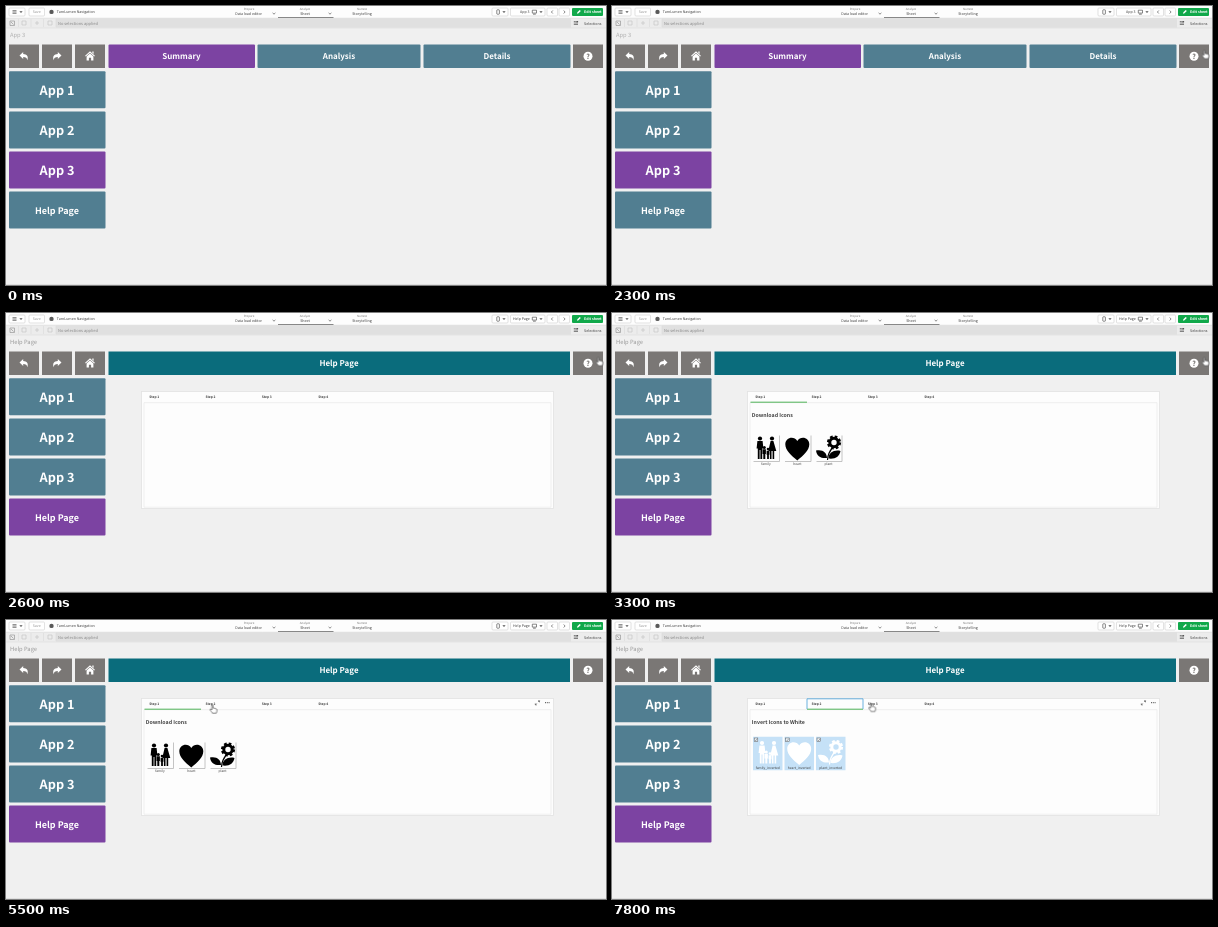
An HTML page that plays this animation: 600x279 px, repeating every 8000 ms.

```html
<!DOCTYPE html>
<html lang="en">
<head>
<meta charset="utf-8">
<title>Help page navigation</title>
<style>
html, body { margin: 0; width: 100%; height: 100%; overflow: hidden; background: #f0f0f0; }
svg { display: block; width: 100vw; height: 100vh; }
text {
  font-family: "Noto Sans CJK JP", "Noto Sans CJK SC", "Noto Sans", sans-serif;
  font-size: 3.6px; fill: #404040; text-rendering: geometricPrecision;
}
.mid text, text.mid { text-anchor: middle; }
.sub { font-size: 2.9px; fill: #777; }
.title { font-size: 5.8px; }
.tile { fill: #517e91; }
.on { fill: #7c43a2; }
.gray { fill: #7a7775; }
.big text, .tabs text { fill: #fff; font-weight: 600; }
.big text { font-size: 12.7px; }
.big .long { font-size: 9px; }
.tabs text { font-size: 8px; }
.box { fill: #fff; stroke: #cfcfcf; stroke-width: .6; }
.panel { fill: #fdfdfd; stroke: #e2e2e2; stroke-width: .8; }
.line { fill: none; stroke: #555; stroke-width: .7; }
.faint { fill: none; stroke: #c6c6c6; stroke-width: .7; }
.steps text, .names text { font-size: 3.3px; }
.steps text { font-weight: 600; }
.head { font-size: 5.25px; font-weight: 600; }

/* Scene switches */
.app, .blank, .help, .late, .one, .two, .head2, .files, .tools, .cursor, .arrow, .hand {
  animation: 8s step-end infinite;
}
.app { animation-name: app; }
.blank { animation-name: blank; }
.help { animation-name: help; }
.late { animation-name: late; }
.one { animation-name: one; }
.two { animation-name: two; }
.head2 { animation-name: head2; }
.files { animation-name: files; }
.tools { animation-name: tools; }
.arrow { animation-name: arrow; }
.hand { animation-name: hand; }
.cursor { animation: move 8s ease-in-out infinite; }
@keyframes app { 0% { opacity: 1 } 30%, 100% { opacity: 0 } }
@keyframes blank { 0% { opacity: 0 } 30% { opacity: 1 } 32.5%, 100% { opacity: 0 } }
@keyframes help { 0% { opacity: 0 } 32.5%, 100% { opacity: 1 } }
@keyframes late { 0% { opacity: 0 } 30%, 100% { opacity: 1 } }
@keyframes one { 0% { opacity: 0 } 33.75% { opacity: 1 } 78.75%, 100% { opacity: 0 } }
@keyframes two { 0% { opacity: 0 } 78.75%, 100% { opacity: 1 } }
@keyframes head2 { 0% { opacity: 0 } 80%, 100% { opacity: 1 } }
@keyframes files { 0% { opacity: 0 } 85%, 100% { opacity: 1 } }
@keyframes tools { 0% { opacity: 0 } 56.25%, 100% { opacity: 1 } }
@keyframes arrow { 0% { opacity: 0 } 11.25% { opacity: 1 } 20% { opacity: 0 } 48.75% { opacity: 1 } 56.25%, 100% { opacity: 0 } }
@keyframes hand { 0% { opacity: 0 } 20% { opacity: 1 } 48.75% { opacity: 0 } 56.25%, 100% { opacity: 1 } }
@keyframes move {
  0%, 10% { transform: translate(66px, 166px) }
  21.25% { transform: translate(591px, 47px) }
  23.75%, 46.25% { transform: translate(592.6px, 44.5px) }
  57.5%, 61.25% { transform: translate(164.3px, 81px) }
  68.75%, 90% { transform: translate(206.6px, 85px) }
  97.5%, 100% { transform: translate(259.3px, 83.3px) }
}
</style>
</head>
<body>
<svg viewBox="0 0 600 279">
  <defs>
    <path id="caret" d="M-1.6-.7h3.2L0 1.1z" fill="#555"/>
    <path id="chevron" class="line" d="M-1.4-.6L0 .7 1.4-.6"/>
    <path id="back" d="M-4.5-.6L-.8-4v2.1C3-1.8 4.6.6 3.4 4.2 3 2 1.8 1-.8 1v2z"/>
    <g id="family">
      <circle cx="-6" cy="-9.5" r="2.1"/><circle cx="6" cy="-9.5" r="2.1"/>
      <circle cx="-1.7" cy="-.6" r="1.5"/><circle cx="2" cy="1" r="1.3"/>
      <path d="M-8.6-7h5.2l.8 7.4h-1.2V11h-1.8V2h-.8v9h-1.8V.4h-1.2zM4.6-7h2.8l2.9 10H8.2v8H6.6V3H5.5v8H3.9V3H2.3zM-3.4 1.3h3.3v4.6h-.6V11h-2V5.9h-.7zM.6 2.7h2.8v4h-.5V11H1.1V6.7H.6z"/>
    </g>
    <path id="heart" d="M0 12C-6 7-12 2-12-4.2-12-11-3.4-13.2 0-7.4 3.4-13.2 12-11 12-4.2 12 2 6 7 0 12z"/>
    <g id="plant">
      <path d="M-12.5 2C-6 .5-1.500 4-1.500 9.500-8 10-11.500 8-12.500 2zM12 2.500C6 1 0 4 0 10c7 .8 11-2 12-7.500z"/>
      <path d="M-1 11.500C-1 6 1.500 2 5-2" fill="none" stroke="currentColor" stroke-width="1.2"/>
      <circle cx="5.500" cy="-6" r="4.200" fill="none" stroke="currentColor" stroke-width="3"/>
      <circle cx="5.500" cy="-6" r="5.800" fill="none" stroke="currentColor" stroke-width="2.600" stroke-dasharray="2.600 1.955"/>
    </g>
    <g id="nav">
      <path class="gray" d="M3 38.500h30v23.500H3zM36 38.500h30v23.500H36zM69 38.500h30v23.500H69zM567 38.500h30v23.500H567z"/>
      <g fill="#fff">
        <use href="#back" x="18" y="50"/>
        <use href="#back" transform="translate(51 50) scale(-1 1)"/>
        <path d="M84 45.300l4.900 4.500-.7.800L84 46.700l-4.200 3.900-.7-.8zM86.300 45.500h1.300v2.500l-1.300-1.200zM84 47.500l3.400 3.100v3.900h-2.300v-2.700h-2.200v2.700h-2.300v-3.900z"/>
        <circle cx="582" cy="50.300" r="4.500"/>
      </g>
      <text x="582" y="52.900" class="mid" style="font-size:7px;font-weight:700;fill:#6d6a68">?</text>
    </g>
    <g id="apps" class="big mid">
      <text x="51" y="88.700">App 1</text>
      <text x="51" y="128.700">App 2</text>
      <text x="51" y="168.900">App 3</text>
      <text x="51" y="207.500" class="long">Help Page</text>
    </g>
    <g id="check">
      <rect width="3.600" height="3.600" fill="#eef6fc" stroke="#555" stroke-width=".5"/>
      <path d="M.8 1.900l.8.8 1.400-1.900" class="line" style="stroke-width:.5"/>
    </g>
  </defs>

  <rect width="600" height="279" fill="#f0f0f0"/>
  <path d="M0 278.500h600" stroke="#dedede"/>

  <!-- Top bar -->
  <rect width="600" height="12" fill="#fdfdfd"/>
  <g class="box">
    <rect x="3" y="2" width="16" height="8" rx="1"/>
    <rect x="23" y="2" width="15.500" height="8" rx="1"/>
    <rect x="486" y="2" width="16" height="8" rx="1"/>
    <rect x="504.500" y="2" width="34.500" height="8" rx="1"/>
    <rect x="541" y="2" width="10.500" height="8" rx="1"/>
    <rect x="553" y="2" width="10.500" height="8" rx="1"/>
  </g>
  <path class="line" d="M6.500 4.600h4M6.500 6h4M6.500 7.400h4"/>
  <use href="#caret" x="15" y="6"/>
  <text x="30.700" y="7.300" class="mid" style="fill:#999">Save</text>
  <circle cx="45.500" cy="5.900" r="2.200" fill="#595959"/>
  <text x="50.800" y="7.300">TarnLumen Navigation</text>
  <g class="mid">
    <text x="243" y="4.200" class="sub">Prepare</text>
    <text x="299" y="4.200" class="sub">Analyze</text>
    <text x="356" y="4.200" class="sub">Narrate</text>
    <text x="242.600" y="8.900" font-weight="500">Data load editor</text>
    <text x="299" y="8.900" font-weight="500">Sheet</text>
    <text x="356" y="8.900" font-weight="500">Storytelling</text>
  </g>
  <use href="#chevron" x="268" y="7.500"/>
  <use href="#chevron" x="324" y="7.500"/>
  <path d="M272 11.500h55.500" stroke="#666" stroke-width=".9"/>
  <rect x="490.800" y="3.800" width="2.600" height="4.400" rx=".5" class="line"/>
  <use href="#caret" x="498" y="6"/>
  <text x="514" y="7.300" class="app">App 3</text>
  <text x="507" y="7.300" class="late">Help Page</text>
  <path class="line" d="M526.300 4.200h4.200v2.900h-4.200zM527 8.200h2.800"/>
  <use href="#caret" x="535" y="6"/>
  <path class="line" d="M546.800 4.500L545.400 6l1.400 1.500M557.700 4.500L559.100 6l-1.400 1.500"/>
  <rect x="566" y="2" width="31" height="8" rx="1" fill="#10a84a"/>
  <path d="M571 7.700l.4-1.500 2.300-2.300 1.100 1.100-2.300 2.300z" fill="#fff"/>
  <text x="578" y="7.300" font-weight="600" style="fill:#fff">Edit sheet</text>

  <!-- Selections bar -->
  <rect y="12" width="600" height="10" fill="#ececec"/>
  <rect x="50" y="12.500" width="515" height="9" fill="#e0e0e0"/>
  <path d="M0 12.200h600M0 22h600" stroke="#dcdcdc" stroke-width=".6"/>
  <path class="line" style="stroke:#999" d="M4 15h4.500v4.500H4zM5 16l2.500 2.500"/>
  <path class="faint" d="M16 15h4v4h-4zM29 17h4M31 15v4M42 15h4v4h-4z"/>
  <path d="M12.500 13v8M25 13v8M37.500 13v8M50 13v8" stroke="#dadada" stroke-width=".6"/>
  <text x="52" y="18.500" style="font-size:4px;fill:#888">No selections applied</text>
  <path class="line" d="M567.800 15.500h2M567.800 17h4.200M567.800 18.500h4.200"/>
  <rect x="570.300" y="15" width="1.800" height="1.300" fill="#555"/>
  <text x="578" y="18.500" font-weight="500">Selections</text>

  <text x="4" y="31.300" class="title app" style="fill:#b0b0b0">App 3</text>
  <text x="4" y="31.300" class="title late" style="fill:#999">Help Page</text>

  <!-- First sheet -->
  <g class="app">
    <use href="#nav"/>
    <g class="tile">
      <rect x="102.500" y="38.500" width="146.500" height="23.500" rx="1" class="on"/>
      <rect x="251.500" y="38.500" width="163" height="23.500" rx="1"/>
      <rect x="417.500" y="38.500" width="147" height="23.500" rx="1"/>
      <rect x="3" y="65.300" width="96.500" height="37" rx="1"/>
      <rect x="3" y="105.400" width="96.500" height="37" rx="1"/>
      <rect x="3" y="145.600" width="96.500" height="37" rx="1" class="on"/>
      <rect x="3" y="185.600" width="96.500" height="37" rx="1"/>
    </g>
    <g class="tabs mid">
      <text x="175.500" y="53.300">Summary</text>
      <text x="333" y="53.300">Analysis</text>
      <text x="491" y="53.300">Details</text>
    </g>
    <use href="#apps"/>
  </g>

  <!-- Loading placeholders -->
  <g class="blank">
    <path class="panel" d="M2.500 38.500h31v23.500h-31zM35.500 38.500h31v23.500h-31zM68.500 38.500h31v23.500h-31zM102.500 38.500h462v23.500h-462zM566.500 38.500h31v23.500h-31zM2.500 65.500h97v37h-97zM2.500 105.500h97v37h-97zM2.500 145.500h97v37h-97zM2.500 185.500h97v37h-97zM135.500 78.500h412v117.500h-412z"/>
  </g>

  <!-- Help sheet -->
  <g class="help">
    <use href="#nav"/>
    <rect x="102.500" y="38.500" width="461.500" height="23.500" fill="#0a6c7c"/>
    <g class="tabs mid"><text x="333" y="53.300">Help Page</text></g>
    <g class="tile">
      <rect x="3" y="65.300" width="96.500" height="37" rx="1"/>
      <rect x="3" y="105.400" width="96.500" height="37" rx="1"/>
      <rect x="3" y="145.600" width="96.500" height="37" rx="1"/>
      <rect x="3" y="185.600" width="96.500" height="37" rx="1" class="on"/>
    </g>
    <use href="#apps"/>

    <rect x="135.500" y="78.500" width="412" height="117" class="panel"/>
    <path d="M138 89.700h407v104.500H138z" fill="#fdfdfd" stroke="#e8e8e8" stroke-width=".7"/>
    <g class="steps">
      <text x="143.200" y="85.200">Step 1</text>
      <text x="199.500" y="85.200">Step 2</text>
      <text x="255.800" y="85.200">Step 3</text>
      <text x="312.200" y="85.200">Step 4</text>
    </g>
    <g class="tools">
      <path class="line" d="M529.400 84.800l1.300-1.300M532.200 82l1.300-1.300M529.300 83.400v1.500h1.500M532 80.800h1.500v1.500"/>
      <path d="M539 82.700h4.600" stroke="#444" stroke-width="1" stroke-dasharray="1 .8"/>
    </g>

    <g class="one">
      <path d="M138.500 89.200H195" stroke="#4fb257" stroke-width="1"/>
      <text x="139.800" y="104.300" class="head">Download Icons</text>
      <path d="M141.500 148.500h26v-26M173 148.500h26v-26M204.500 148.500h25.500v-26" fill="none" stroke="#b5b5b5" stroke-width=".8"/>
      <g fill="#000" color="#000">
        <use href="#family" x="154" y="135"/>
        <use href="#heart" x="185.300" y="135.500"/>
        <use href="#plant" x="216.500" y="135.500"/>
      </g>
      <g class="names mid">
        <text x="154" y="152.400">family</text>
        <text x="185.300" y="152.400">heart</text>
        <text x="216.500" y="152.400">plant</text>
      </g>
    </g>

    <path class="two" d="M195 89.200h56" stroke="#4fb257" stroke-width="1"/>
    <text x="139.800" y="104.300" class="head head2">Invert Icons to White</text>
    <g class="files">
      <path d="M195 89V78.800h56V89" fill="none" stroke="#5aa9dc" stroke-width=".9"/>
      <path d="M141 116.700h29.500v33.500H141zM172.500 116.700H202v33.500h-29.500zM204 116.700h29.500v33.500H204z" fill="#c5e1f7"/>
      <g fill="#fff" color="#fff">
        <use href="#family" x="156" y="132.500"/>
        <use href="#heart" x="187.200" y="133"/>
        <use href="#plant" x="218.500" y="133"/>
      </g>
      <use href="#check" x="142.200" y="118"/>
      <use href="#check" x="173.600" y="118"/>
      <use href="#check" x="205" y="118"/>
      <g class="names mid">
        <text x="155.800" y="148.600">family_inverted</text>
        <text x="187.200" y="148.600">heart_inverted</text>
        <text x="218.700" y="148.600">plant_inverted</text>
      </g>
    </g>
  </g>

  <g class="cursor" fill="#fff" stroke="#333" stroke-width=".6" stroke-linejoin="round">
    <path class="arrow" d="M0 0v6.300l1.500-1.300 1 2.300 1-.4-1-2.300h2z"/>
    <path class="hand" d="M-.8.600C-.8-.2.500-.2.500.600v2.600c.4-.4 1.200-.2 1.300.3.400-.3 1.200-.1 1.300.4.400-.2 1.200 0 1.200.7v1.500c0 1-.5 1.200-.6 2.100H-.3C-.5 7.200-2 6.100-2.600 4.800c-.3-.7.600-1.100 1.100-.6l.7.800z"/>
  </g>
</svg>
</body>
</html>
```
